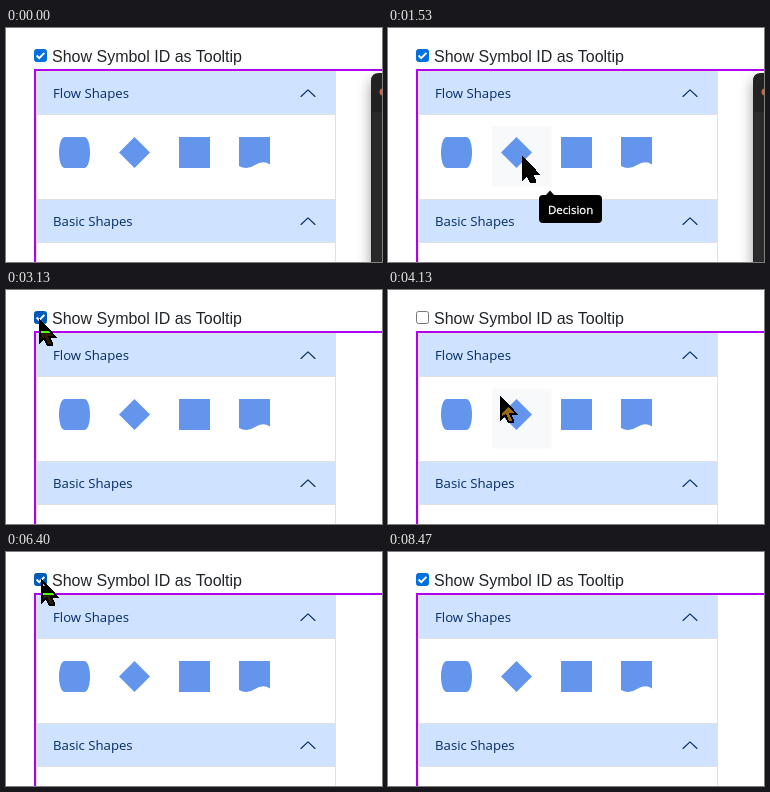
Animation of 376x234 px, one loop 9.27 s. Source, as an HTML page:

```html
<!DOCTYPE html>
<html lang="en">
<head>
<meta charset="utf-8">
<title>Symbol palette tooltip</title>
<style>
  html, body { margin: 0; width: 100%; height: 100%; overflow: hidden; background: #fff; }
  svg { display: block; width: 376px; height: 234px; isolation: isolate; }
  .label { font: 16px "Liberation Sans", Arial, sans-serif; fill: #212529; }
  .title { font: 13.2px "Open Sans", "Noto Sans", sans-serif; fill: #052c65; }
  .tip { font: 11.4px "Open Sans", "Noto Sans", sans-serif; fill: #fff; stroke: #fff; stroke-width: .3; }
  .chevron { fill: none; stroke: #052c65; stroke-width: 1.1; stroke-linecap: round; stroke-linejoin: round; }
  .pointer { shape-rendering: crispEdges; }
  .invert { fill: #fff; mix-blend-mode: difference; }
  .outline { fill: none; stroke: #000; stroke-width: 2; }
</style>
</head>
<body>
<svg viewBox="0 0 376 234">
  <defs>
    <filter id="shadow" x="-2" y="-.2" width="5" height="1.4">
      <feDropShadow dx="0" dy="6" stdDeviation="7" flood-opacity=".4"/>
    </filter>
    <path id="arrow" d="M1 1V22L5.5 18L8.5 25H12.5V22L10 17H16.5Z"/>
    <path id="chevron" class="chevron" d="M295 68.5L302 61.8L309 68.5"/>
  </defs>
  <rect width="376" height="234" fill="#fff"/>

  <rect id="box" x="28.5" y="21.5" width="12" height="12" rx="2"/>
  <path id="check" d="M30.6 27.5L33.2 30.1L38.4 24.9" fill="none" stroke="#fff" stroke-width="2"/>
  <text class="label" x="46" y="34">Show Symbol ID as Tooltip</text>

  <path d="M376 42H29V234" fill="none" stroke="#b000f0" stroke-width="2"/>
  <path d="M30 43H330V87H30ZM30 171H330V215H30Z" fill="#cfe2ff"/>
  <path d="M30.5 234V43.5H329.5V234M30 86.5H330M30 171.5H330M30 214.5H330" fill="none" stroke="#dee2e6"/>
  <text class="title" x="47" y="70">Flow Shapes</text>
  <text class="title" x="47" y="198">Basic Shapes</text>
  <use href="#chevron"/>
  <use href="#chevron" y="128"/>

  <rect id="hover" x="103.5" y="98.5" width="60" height="60" fill="#f8f9fa"/>
  <g fill="#6495ed">
    <path d="M59 109H78C86 109 86 140 78 140H59C51 140 51 109 59 109Z"/>
    <path d="M128.5 109L144 124.5L128.5 140L113 124.5Z"/>
    <rect x="173" y="109" width="31" height="31"/>
    <path d="M233 109H264V136.5Q257 132 249 137Q241 142.5 233 138Z"/>
  </g>

  <g id="window">
    <path d="M400 45H373Q365 45 365 53V260H400Z" fill="#232121" filter="url(#shadow)"/>
    <path d="M366 84H376V234H366Z" fill="#2a2a2a"/>
    <circle cx="377" cy="64" r="3.5" fill="#d9603b"/>
  </g>

  <g id="tooltip">
    <path d="M157 168L162 162.5L167 168Z"/>
    <rect x="151" y="167" width="63" height="28" rx="4"/>
    <text class="tip" x="160" y="185.5">Decision</text>
  </g>

  <g id="pointer" class="pointer">
    <use class="outline" href="#arrow"/>
  </g>
  <use id="inversion" class="pointer invert" href="#arrow"/>
</svg>
<script>
const LOOP = 9270, RATE = 15;
const el = id => document.getElementById(id);
const show = (id, on) => el(id).style.display = on ? "" : "none";

// Draw the outline above the inverting fill.
el("pointer").before(el("inversion"));

// Pointer moves, timed in ticks; it rests between them.
const entry = { x: 372, y: 214 };
const moves = [
  { start: 3, end: 17, x: 134, y: 129 },
  { start: 31, end: 44, x: 33, y: 30 },
  { start: 55, end: 69, x: 129, y: 123 },
  { start: 78, end: 88, x: 35, y: 28 },
  { start: 101, end: 112, x: 132, y: 125 },
  { start: 124, end: 127, x: 85, y: 240 }
];
const easeOut = u => 1 - (1 - u) ** 2.5;

function pointerAt(tick) {
  let { x, y } = entry;
  for (const move of moves) {
    const u = (tick - move.start) / (move.end - move.start);
    const k = easeOut(Math.min(1, Math.max(0, u)));
    x += (move.x - x) * k;
    y += (move.y - y) * k;
  }
  return { x: Math.round(x), y: Math.round(y) };
}

const inside = (p, x, y, size) => p.x >= x && p.x < x + size && p.y >= y && p.y < y + size;

function drawCheckbox(checked, state) {
  const accent = { idle: "#0070dc", hover: "#005bb8", press: "#3793f0" }[state];
  const line = { idle: "#767676", hover: "#4f4f4f", press: "#8d8d8d" }[state];
  el("box").setAttribute("fill", checked ? accent : "#fff");
  el("box").setAttribute("stroke", checked ? accent : line);
  show("check", checked);
}

function render(ms) {
  const tick = Math.floor((ms % LOOP + 5) * RATE / 1000);
  const pointer = pointerAt(tick);
  const visible = tick > moves[0].start && tick < moves.at(-1).end;
  const checked = tick < 51 || tick >= 96;
  const pressed = tick === 50 || (tick >= 92 && tick < 96);
  const onBox = visible && inside(pointer, 28, 21, 13);
  const onSymbol = visible && inside(pointer, 103, 98, 60);

  drawCheckbox(checked, pressed ? "press" : onBox ? "hover" : "idle");
  show("window", tick < 47);
  show("hover", onSymbol);
  show("tooltip", onSymbol && checked);
  for (const id of ["inversion", "pointer"]) {
    show(id, visible);
    el(id).setAttribute("transform", `translate(${pointer.x} ${pointer.y})`);
  }
}

const start = performance.now();
function frame() {
  render(performance.now() - start);
  requestAnimationFrame(frame);
}
frame();
</script>
</body>
</html>
```
